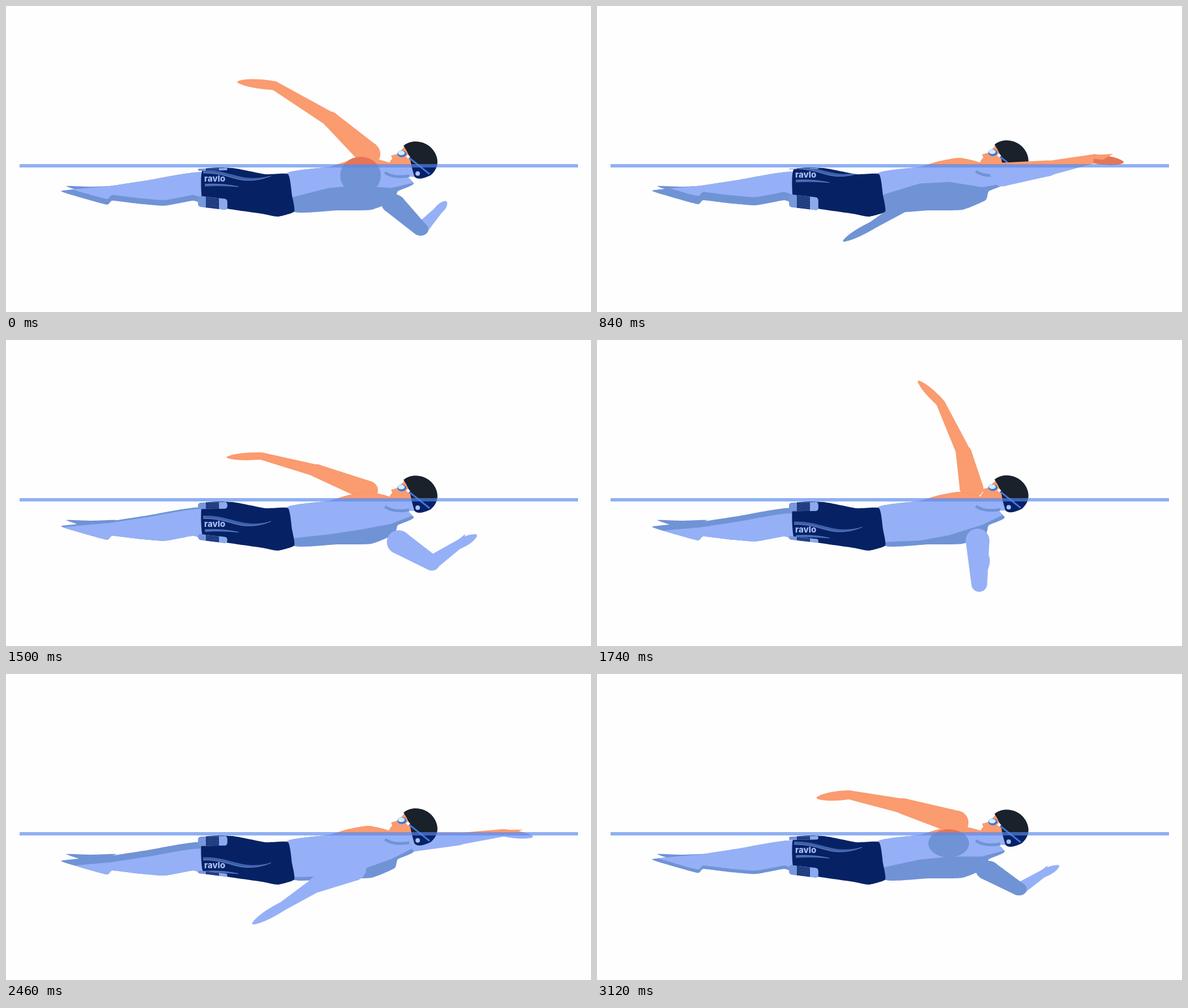
These frames come from a looping animation (1033 px wide and 542 px high, 3.24 s). An HTML page with a canvas:

```html
<!DOCTYPE html>
<html lang="en">
<head>
<meta charset="utf-8">
<title>Backstroke</title>
<style>
  html, body { margin: 0; width: 100%; height: 100%; overflow: hidden; background: #fefefe; }
  canvas { display: block; width: 100vw; height: 100vh; }
</style>
</head>
<body>
<canvas id="stage" width="1033" height="542"></canvas>
<script>
const ctx = document.getElementById('stage').getContext('2d');
const LOOP = 3240, STEP = 60, LAST = 3120, WATER = 283;
const FAR_DELAY = 1580, FAR_SCALE = 0.81;

const AIR = { light: [250, 155, 112], shade: [229, 117, 86], cap: '#19212a' };
const SEA = { light: [149, 176, 246], shade: [112, 147, 214], cap: '#062265' };

// ---- Motion ----------------------------------------------------------------
const mix = (a, b, k) => a + (b - a) * k;
const clamp = x => Math.min(1, Math.max(0, x));
const wave = (t, peak, period) => Math.cos(2 * Math.PI * (t - peak) / period);
const during = (t, from, to) => clamp(Math.min(t - from, to - t) / 120 + 0.5);

// 0: near side turned up; 1: far side turned up
function rollAt(t) {
  const k = (1 - wave(t, 570, LOOP)) / 2;
  return k * k * (3 - 2 * k);
}

// One stroke, shared by both arms: shoulder, elbow, wrist and fingertip.
const stroke = [];
function strokeKey(t, ...joints) {
  const v = joints.slice(0, 2);
  for (let i = 0; i < 6; i += 2) {
    const dx = joints[i + 2] - joints[i], dy = joints[i + 3] - joints[i + 1];
    v.push(Math.atan2(dy, dx), Math.hypot(dx, dy));
  }
  stroke.push({ t, v });
}
strokeKey(0, 640,262, 573,201, 474,141, 409,134);
strokeKey(360, 687,258, 724,197, 766,97, 782,43);
strokeKey(860, 716,300, 798,291, 878,276, 930,284);
strokeKey(1260, 715,322, 790,329, 870,310, 917,305);
strokeKey(1540, 690,363, 745,404, 785,372, 816,353);
strokeKey(1660, 684,366, 732,422, 763,381, 778,361);
strokeKey(1740, 672,355, 675,432, 682,405, 690,380);
strokeKey(2020, 655,369, 645,427, 648,413, 645,397);
strokeKey(2460, 615,345, 548,373, 489,411, 435,442);
strokeKey(2920, 630,282, 550,335, 470,372, 428,393);
strokeKey(3120, 635,263, 540,234, 445,214, 388,219);

// Make joint angles continuous, and note how far they turn in one loop.
const turn = [];
for (const m of [2, 4, 6]) {
  const first = stroke[0].v[m];
  let prev = first;
  const near = a => prev += Math.atan2(Math.sin(a - prev), Math.cos(a - prev));
  for (const key of stroke) key.v[m] = near(key.v[m]);
  turn[m] = near(first) - first;
}

// Cyclic cubic interpolation through the stroke keys.
function strokeAt(t) {
  const n = stroke.length;
  const at = j => {
    const cycle = Math.floor(j / n), key = stroke[j - cycle * n];
    return { t: key.t + cycle * LOOP, v: key.v.map((x, m) => x + cycle * (turn[m] || 0)) };
  };
  let i = n - 1;
  while (stroke[i].t > t) i--;
  const a = at(i - 1), b = at(i), c = at(i + 1), d = at(i + 2);
  const span = c.t - b.t, u = (t - b.t) / span, u2 = u * u, u3 = u2 * u;
  return b.v.map((x, m) => {
    const s0 = (c.v[m] - a.v[m]) / (c.t - a.t) * span;
    const s1 = (d.v[m] - x) / (d.t - b.t) * span;
    return (2*u3 - 3*u2 + 1) * x + (u3 - 2*u2 + u) * s0 + (3*u2 - 2*u3) * c.v[m] + (u3 - u2) * s1;
  });
}

// ---- Drawing helpers -------------------------------------------------------
const rgb = c => `rgb(${c.map(Math.round).join()})`;
const tone = (pal, k) => rgb(pal.light.map((x, i) => mix(x, pal.shade[i], k)));

function fill(path, color) {
  ctx.fillStyle = color;
  ctx.fill(path);
}
function line(d, color, width) {
  ctx.strokeStyle = color;
  ctx.lineWidth = width;
  ctx.stroke(new Path2D(d));
}
function oval(x, y, rx, ry, color) {
  ctx.beginPath();
  ctx.ellipse(x, y, rx, ry, 0, 0, 7);
  ctx.fillStyle = color;
  ctx.fill();
}
function blob(...v) {
  const n = v.length / 2, path = new Path2D();
  const pt = i => { const k = (i + n) % n * 2; return [v[k], v[k + 1]]; };
  path.moveTo(...pt(0));
  for (let i = 0; i < n; i++) {
    const [a, b, c, d] = [pt(i - 1), pt(i), pt(i + 1), pt(i + 2)];
    path.bezierCurveTo(b[0] + (c[0] - a[0]) / 12, b[1] + (c[1] - a[1]) / 12,
      c[0] - (d[0] - b[0]) / 12, c[1] - (d[1] - b[1]) / 12, ...c);
  }
  return path;
}
function within(path, draw) {
  ctx.save();
  ctx.clip(path);
  draw();
  ctx.restore();
}
function limb(x, y, r, x2, y2, r2, color) {
  const a = Math.atan2(y2 - y, x2 - x) + Math.PI / 2;
  const nx = Math.cos(a), ny = Math.sin(a);
  oval(x, y, r, r, color);
  oval(x2, y2, r2, r2, color);
  ctx.beginPath();
  ctx.moveTo(x + nx * r, y + ny * r);
  ctx.lineTo(x2 + nx * r2, y2 + ny * r2);
  ctx.lineTo(x2 - nx * r2, y2 - ny * r2);
  ctx.lineTo(x - nx * r, y - ny * r);
  ctx.fill();
}

// ---- Swimmer ---------------------------------------------------------------
const LEGS = blob(97,327, 140,322, 185,318, 250,308, 345,294, 347,347, 330,344, 280,353, 230,349, 188,344, 178,351, 130,338);
const FAR_FOOT = blob(106,319, 150,320, 195,319, 150,332);
const SHORTS = blob(347,290, 400,287, 458,298, 498,298, 505,335, 509,364, 480,373, 452,368, 390,359, 348,350);
const TORSO = blob(495,297, 570,285, 600,276, 640,269, 680,279, 720,314, 692,328, 686,344, 645,361, 585,362, 507,364);
// Lower border of the lit side of the torso at either end of the roll
const EDGE_X = [490, 508, 570, 622, 680, 735];
const EDGE_NEAR = [350, 333, 314, 311, 321, 312], EDGE_FAR = [362, 360, 359, 349, 328, 300];

function drawArm([sx, sy, a1, l1, a2, l2, a3, l3], upper, fore, hand) {
  const ex = sx + Math.cos(a1) * l1, ey = sy + Math.sin(a1) * l1;
  const wx = ex + Math.cos(a2) * l2, wy = ey + Math.sin(a2) * l2;
  limb(ex, ey, 13, wx, wy, 8, fore);
  limb(sx, sy, 21, ex, ey, 14, upper);
  const thumb = Math.max(0, Math.cos(a3));
  ctx.save();
  ctx.translate(wx, wy);
  ctx.rotate(a3);
  fill(new Path2D(`M0 8 Q${l3 * .7} 10 ${l3} 1 L${l3} -2 Q${l3 * .7} -10 0 -8Z`), hand);
  fill(new Path2D(`M0 -7 Q${l3 * .3} -9 ${l3 * .62 * thumb} ${-13 * thumb} L${l3 * .3} 0 L0 0Z`), fore);
  ctx.restore();
}

function drawLegs(roll, light, shade) {
  fill(FAR_FOOT, shade);
  ctx.save();
  ctx.translate(0, 4 * roll);
  fill(LEGS, shade);
  within(LEGS, () => {
    ctx.translate(0, mix(-15, 12, roll));
    fill(LEGS, light);
  });
  ctx.restore();
}

function drawTorso(roll, light, shade) {
  fill(TORSO, shade);
  within(TORSO, () => {
    const lit = new Path2D('M735 200 L480 200');
    EDGE_X.forEach((x, i) => lit.lineTo(x, mix(EDGE_NEAR[i], EDGE_FAR[i], roll)));
    fill(lit, light);
  });
}

function drawBuoy(y, height, slope) {
  ctx.save();
  ctx.transform(1, slope, 0, 1, 339, y);
  const shape = new Path2D();
  shape.roundRect(0, 0, 52, height, Math.min(5, height / 2));
  fill(shape, '#7897dd');
  within(shape, () => {
    ctx.fillStyle = '#173477';
    ctx.fillRect(14, 0, 23, height);
    ctx.fillStyle = '#6684c8';
    for (let row = 1; row < height; row += 3)
      for (let x = 15 + row % 2 * 1.5; x < 36; x += 3) ctx.fillRect(x, row, 1.1, 1.1);
    ctx.fillStyle = '#8ca9ef';
    ctx.fillRect(37, 0, 14, height);
  });
  ctx.restore();
}

function drawShorts(roll) {
  fill(SHORTS, '#062265');
  within(SHORTS, () => {
    ctx.translate(0, mix(304, 346, roll));
    fill(new Path2D('M348 -21 C385 -22 405 -8 435 -7 Q452 -7 468 -11 Q445 -2 425 -3 C400 -4 388 -16 348 -16Z'), '#3f60aa');
    line('M348 -16 C388 -16 400 -4 425 -3 Q447 -2 468 -11', '#6c8bd0', 1);
    fill(new Path2D('M351 3 Q385 1 413 9 Q380 6 351 8Z'), '#3f60aa');
    line('M352 5 Q382 3 410 8', '#7492d5', 0.8);
    ctx.fillStyle = '#a7bff8';
    ctx.font = '800 15px Inter, sans-serif';
    ctx.fillText('ravlo', 350, -1);
  });
  drawBuoy(mix(333, 348, roll), mix(23, 5, roll), 0.12);
  drawBuoy(288, mix(1, 17, roll), -0.02);
}

function drawHead(bob, pal) {
  ctx.save();
  ctx.translate(0, bob);
  fill(new Path2D('M704 249 L692 262 L680 265 L682 271 L679 274 L675 282 Q667 289 672 294 Q682 304 704 302 L721 303 L724 260Z'), tone(pal, 0));
  line('M669 295 Q684 306 712 301', tone(pal, 1), 5);
  fill(new Path2D('M702 248 C715 236 741 238 754 255 C766 271 764 288 750 300 Q727 311 721 302 L716 284 Q714 265 702 248Z'), pal.cap);
  line('M708 266 L748 298', '#3f76df', 3);
  line('M708 265 L712 269', '#f4f9ff', 5);
  oval(699, 262, 8, 6, '#3976dd');
  oval(698, 260.5, 6, 4, '#d3edfa');
  oval(727, 297, 4, 4, '#a9c2fa');
  ctx.restore();
}

function drawSwimmer(t, pal) {
  const roll = rollAt(t), light = tone(pal, 0), shade = tone(pal, 1);
  const farTime = (t - FAR_DELAY + LOOP) % LOOP;
  const near = strokeAt(t), far = strokeAt(farTime);

  ctx.save();
  ctx.translate(0, WATER * (1 - FAR_SCALE));
  ctx.scale(1, FAR_SCALE);
  const foreTone = tone(pal, during(farTime, 1800, 3020));
  drawArm(far, tone(pal, during(farTime, 1440, 2700)), foreTone, foreTone);
  ctx.restore();

  drawLegs(roll, light, shade);
  drawTorso(roll, light, shade);
  drawShorts(roll);
  drawHead(-1.3 - 1.3 * wave(t, 650, LOOP / 2), pal);
  drawArm(near, light, light, tone(pal, during(t, 200, 1400)));

  // Shaded shoulder that lifts out of the water as the near arm recovers
  const lift = wave((t + LOOP / 2) % LOOP, 180 + LOOP / 2, 2200);
  if (Math.abs((t + LOOP / 2) % LOOP - LOOP / 2 - 180) < 550) oval(near[0] - 14, 300, 36, 38 * Math.max(0, lift), shade);
}

function render(t) {
  ctx.fillStyle = '#fefefe';
  ctx.fillRect(0, 0, 1033, 542);
  for (const [pal, top, height] of [[AIR, 0, WATER], [SEA, WATER, 542 - WATER]]) {
    const half = new Path2D();
    half.rect(0, top, 1033, height);
    within(half, () => drawSwimmer(t, pal));
  }
  ctx.fillStyle = 'rgba(87, 135, 239, .65)';
  ctx.fillRect(24, 280, 986, 6);
}

const start = performance.now();
function tick() {
  const t = Math.max(0, performance.now() - start) % LOOP;
  render(Math.min(LAST, Math.floor(t / STEP) * STEP));
  requestAnimationFrame(tick);
}
tick();
</script>
</body>
</html>
```
